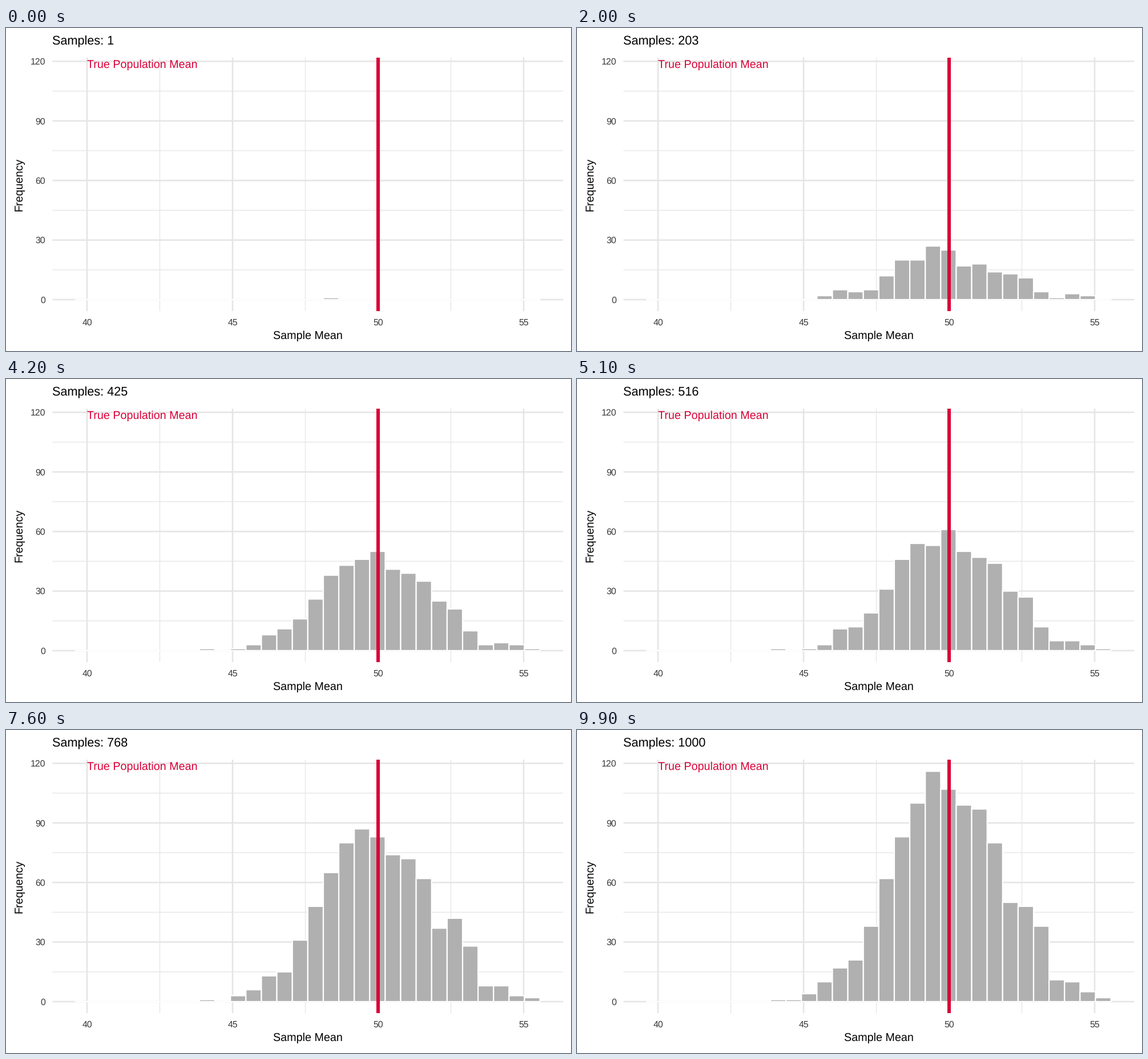
Write a matplotlib script that moves like this. It is 990 px wide and 566 px high and loops after 10 s.

```python
import numpy as np
import matplotlib.pyplot as plt
from matplotlib.animation import FuncAnimation
from matplotlib.patches import Rectangle

W, H, DPI = 990, 566, 100
FRAMES, INTERVAL = 100, 100
GRID, BAR, RED, TICK = "#e5e5e5", "#b0b0b0", "#d90037", "#383838"
LEFT, RIGHT, TOP, BOTTOM = 81.4, 976.2, 52, 496.1
BINS, BIN_W, FIRST_EDGE = 30, 0.5317, 39.61
FIRST_USED = 8
PX = 72 / DPI

plt.rcParams["font.family"] = "Liberation Sans"
plt.rcParams["text.hinting"] = "none"

# Cumulative histogram at a few sample sizes, from bin FIRST_USED upwards
CHECKPOINTS = [
    [0, 0, 0, 2, 5, 4, 5, 12, 20, 20, 27, 25, 17, 18, 14, 13, 11, 4, 1, 3, 2, 0],
    [1, 0, 1, 3, 5, 9, 14, 20, 30, 33, 39, 39, 31, 32, 27, 20, 16, 7, 1, 3, 2, 1],
    [1, 0, 1, 3, 11, 12, 19, 31, 46, 54, 53, 61, 50, 47, 44, 30, 27, 12, 5, 5, 3, 1],
    [1, 0, 2, 6, 11, 13, 23, 39, 52, 67, 69, 67, 60, 57, 51, 36, 35, 21, 7, 6, 3, 1],
    [1, 0, 3, 6, 13, 15, 31, 48, 65, 80, 87, 83, 74, 72, 62, 37, 42, 28, 8, 8, 3, 2],
    [1, 1, 4, 10, 17, 21, 38, 62, 83, 100, 116, 107, 99, 97, 80, 50, 48, 38, 11, 10, 5, 2],
]


def sample_bins():
    """Bin of every sample in drawing order, spread evenly between checkpoints."""
    first = 16
    order = [first]
    prev = np.zeros(BINS, int)
    prev[first] = 1
    for row in CHECKPOINTS:
        now = np.zeros(BINS, int)
        now[FIRST_USED:] = row
        arrivals = []
        for b, m in enumerate(now - prev):
            phase = 0.3 + 0.4 * (b * 0.618 % 1)
            arrivals += [((k + phase) / m, b) for k in range(m)]
        order += [b for _, b in sorted(arrivals)]
        prev = now
    return np.array(order)


def px(x):
    return 142 + (x - 40) * 51


def py(y):
    return 476 - y * 3.48


fig = plt.figure(figsize=(W / DPI, H / DPI), dpi=DPI, facecolor="white")
ax = fig.add_axes([0, 0, 1, 1])
ax.set_xlim(0, W)
ax.set_ylim(H, 0)
ax.axis("off")


def line(xs, ys, color, width, z):
    ax.plot(xs, ys, color=color, lw=width * PX, zorder=z,
            solid_capstyle="butt", snap=False)


def label(x, y, s, size, color="black", ha="left", **kw):
    return ax.text(x, y, s, fontsize=size * PX, color=color, ha=ha,
                   va="baseline", zorder=5, **kw)


def vline(x, width, color=GRID, z=1):
    line([px(x)] * 2, [TOP, BOTTOM], color, width, z)


def hline(y, width):
    line([LEFT, RIGHT], [py(y)] * 2, GRID, width, 1)


for x in (42.5, 47.5, 52.5):
    vline(x, 1.3)
for y in (15, 45, 75, 105):
    hline(y, 1.3)
for x in (40, 45, 50, 55):
    vline(x, 2.56)
    label(px(x), 520.5, str(x), 15.84, TICK, "center")
for y in (0, 30, 60, 90, 120):
    hline(y, 2.56)
    label(69, py(y) + 5.7, str(y), 15.84, TICK, "right")

bars = []
for b in range(BINS):
    bar = Rectangle((px(FIRST_EDGE + b * BIN_W), py(0)), BIN_W * 51, 0,
                    facecolor=BAR, edgecolor="white", lw=2.2 * PX,
                    zorder=2, snap=False)
    bars.append(ax.add_patch(bar))

vline(50, 6, RED, 4)
label(142, 69.5, "True Population Mean", 19.8, RED)
label((LEFT + RIGHT) / 2, 545, "Sample Mean", 19.8, ha="center")
label(28, (TOP + BOTTOM) / 2, "Frequency", 19.8, ha="center",
      rotation=90, rotation_mode="anchor")
title = label(81.4, 29.5, "", 21.6)

SAMPLES = sample_bins()


def update(i):
    n = round(1 + i * (len(SAMPLES) - 1) / (FRAMES - 1))
    counts = np.bincount(SAMPLES[:n], minlength=BINS)
    for bar, c in zip(bars, counts):
        bar.set_height(py(max(c, 0.01)) - py(0))
    title.set_text(f"Samples: {n}")
    return [*bars, title]


anim = FuncAnimation(fig, update, frames=FRAMES, interval=INTERVAL,
                     repeat=True, repeat_delay=0, blit=False)
plt.show()
```
